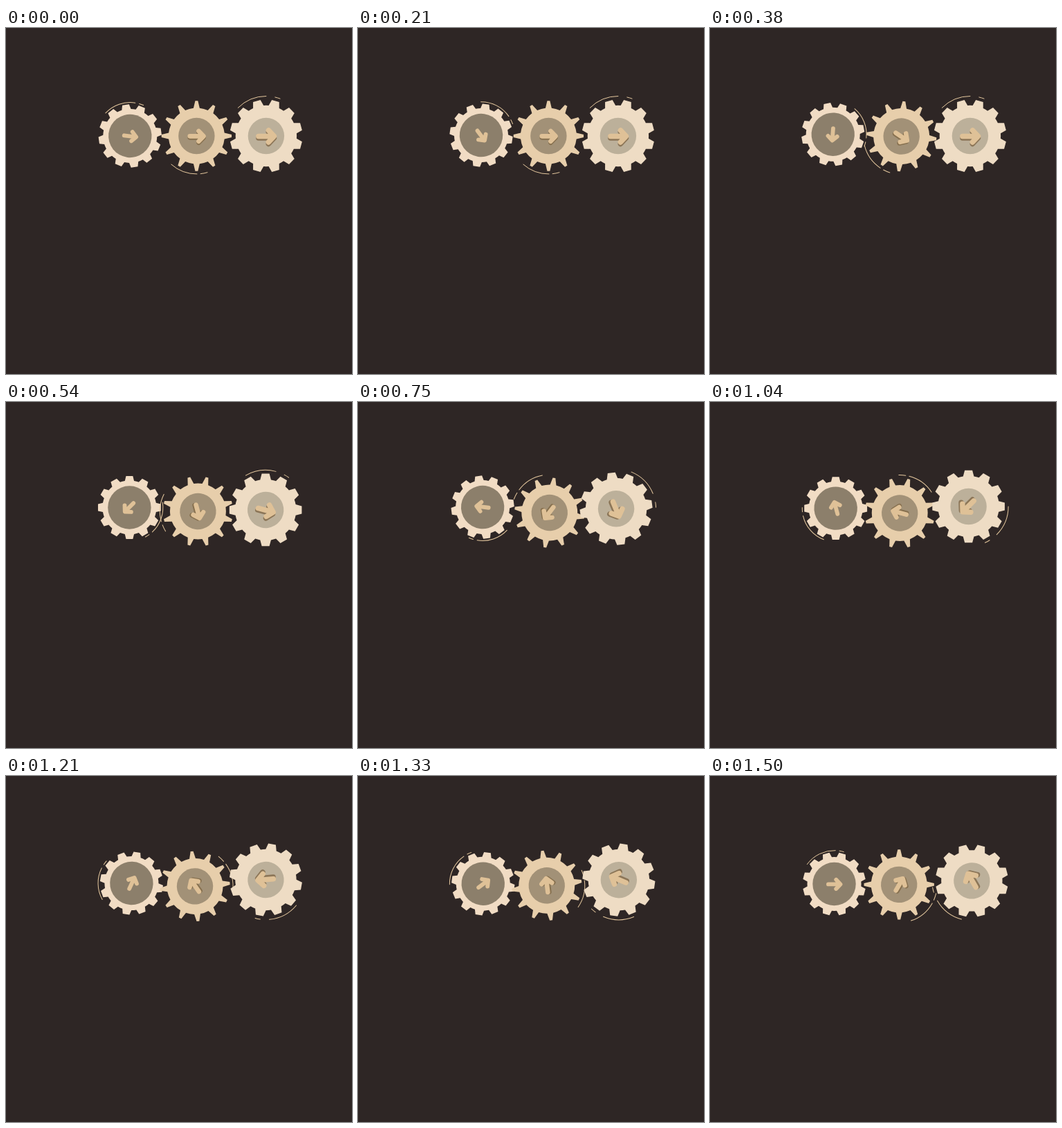
These frames come from a looping animation (500x500 px, 1.54 s). An HTML page:

```html
<!DOCTYPE html>
<html lang="en">
<head>
<meta charset="utf-8">
<title>Turning gears</title>
<style>
  html, body { margin: 0; width: 100%; height: 100%; overflow: hidden; background: #2e2625; }
  svg { display: block; width: 100vw; height: 100vh; }
</style>
</head>
<body>
<svg id="stage" viewBox="0 0 500 500"></svg>
<script>
const LOOP = 1540, FRAMES = 37, TEETH = 12;
const stage = document.getElementById('stage');

// Each gear turns about a pivot that sits slightly off its own centre.
const gears = [
  { pivot: [179.7, 154], off: 2, phase: 95, lag: 0,
    root: 39, tip: 45.7, rootHalf: 9.8, tipHalf: 6.2, first: 15,
    fill: '#f1dcc4', disc: 31.2, discFill: '#8c7f6b',
    arrow: 0.78, shade: 0, shadeFill: '#8c7558',
    ring: 48.4, arcs: [[-144, -88], [-81, -73.5]] },
  { pivot: [275.1, 158.3], off: 2.35, phase: -83, lag: 60,
    root: 40.5, tip: 50.7, rootHalf: 6.3, tipHalf: 2.2, first: 0,
    fill: '#e7ceab', disc: 26.2, discFill: '#a29177',
    arrow: 0.88, shade: 2, shadeFill: '#86704f',
    ring: 55, arcs: [[89.4, 131.6], [73.5, 84]] },
  { pivot: [375.8, 153], off: 3, phase: 88, lag: 120,
    root: 44.2, tip: 52.6, rootHalf: 10.2, tipHalf: 6, first: 15,
    fill: '#eedcc4', disc: 26.2, discFill: '#bcb09a',
    arrow: 1, shade: 2.6, shadeFill: '#8c7658',
    ring: 57.5, arcs: [[-135, -90], [-77, -69.5]] }
];

// Frame and angle of the leading gear.
const turn = [[-1, 0], [0, 7], [5, 53.5], [13, 135], [18, 187.5], [25, 255], [29, 295], [36, 360]];

function polar(r, deg) {
  const a = deg * Math.PI / 180;
  return [r * Math.cos(a), r * Math.sin(a)];
}

const at = (r, deg) => polar(r, deg).map(v => v.toFixed(2)).join(' ');

function add(parent, tag, attrs) {
  const node = document.createElementNS('http://www.w3.org/2000/svg', tag);
  for (const key in attrs) node.setAttribute(key, attrs[key]);
  return parent.appendChild(node);
}

function outline(g) {
  let d = '';
  for (let i = 0; i < TEETH; i++) {
    const a = g.first + i * 360 / TEETH;
    d += i ? `A${g.root} ${g.root} 0 0 1 ` : 'M';
    d += at(g.root, a - g.rootHalf) + 'L' + at(g.tip, a - g.tipHalf);
    d += 'L' + at(g.tip, a + g.tipHalf) + 'L' + at(g.root, a + g.rootHalf);
  }
  return d + `A${g.root} ${g.root} 0 0 1 ${at(g.root, g.first - g.rootHalf)}Z`;
}

function addArrow(parent, g, dy, stroke) {
  add(parent, 'path', {
    d: 'M-11 0H10M3.5 -8.5L11.5 0L3.5 8.5',
    transform: `translate(0 ${dy}) scale(${g.arrow})`,
    fill: 'none', stroke, 'stroke-width': 7.5,
    'stroke-linecap': 'round', 'stroke-linejoin': 'round'
  });
}

function build(g) {
  g.node = add(stage, 'g', {});
  add(g.node, 'path', { d: outline(g), fill: g.fill });
  add(g.node, 'circle', { r: g.disc, fill: g.discFill });
  if (g.shade) addArrow(g.node, g, 0.4 + g.shade, g.shadeFill);
  addArrow(g.node, g, 0.4, '#dfc197');
  for (const [from, to] of g.arcs) {
    add(g.node, 'path', {
      d: `M${at(g.ring, from)}A${g.ring} ${g.ring} 0 0 1 ${at(g.ring, to)}`,
      fill: 'none', stroke: '#e6c99f', 'stroke-width': 1, 'stroke-linecap': 'round'
    });
  }
}

function angleAt(frame) {
  const i = Math.max(1, turn.findIndex(([f]) => f >= frame));
  const [f0, a0] = turn[i - 1], [f1, a1] = turn[i];
  return a0 + (a1 - a0) * (frame - f0) / (f1 - f0);
}

function draw(ms) {
  const step = Math.floor((ms % LOOP) * FRAMES / LOOP + 0.06);
  const lead = angleAt(Math.min(step, FRAMES - 1));
  for (const g of gears) {
    const angle = Math.max(0, lead - g.lag);
    const [dx, dy] = polar(g.off, angle + g.phase);
    g.node.setAttribute('transform',
      `translate(${g.pivot[0] + dx} ${g.pivot[1] + dy}) rotate(${angle})`);
  }
}

gears.forEach(build);
draw(0);
const start = performance.now();
function tick() {
  draw(performance.now() - start);
  requestAnimationFrame(tick);
}
requestAnimationFrame(tick);
</script>
</body>
</html>
```
